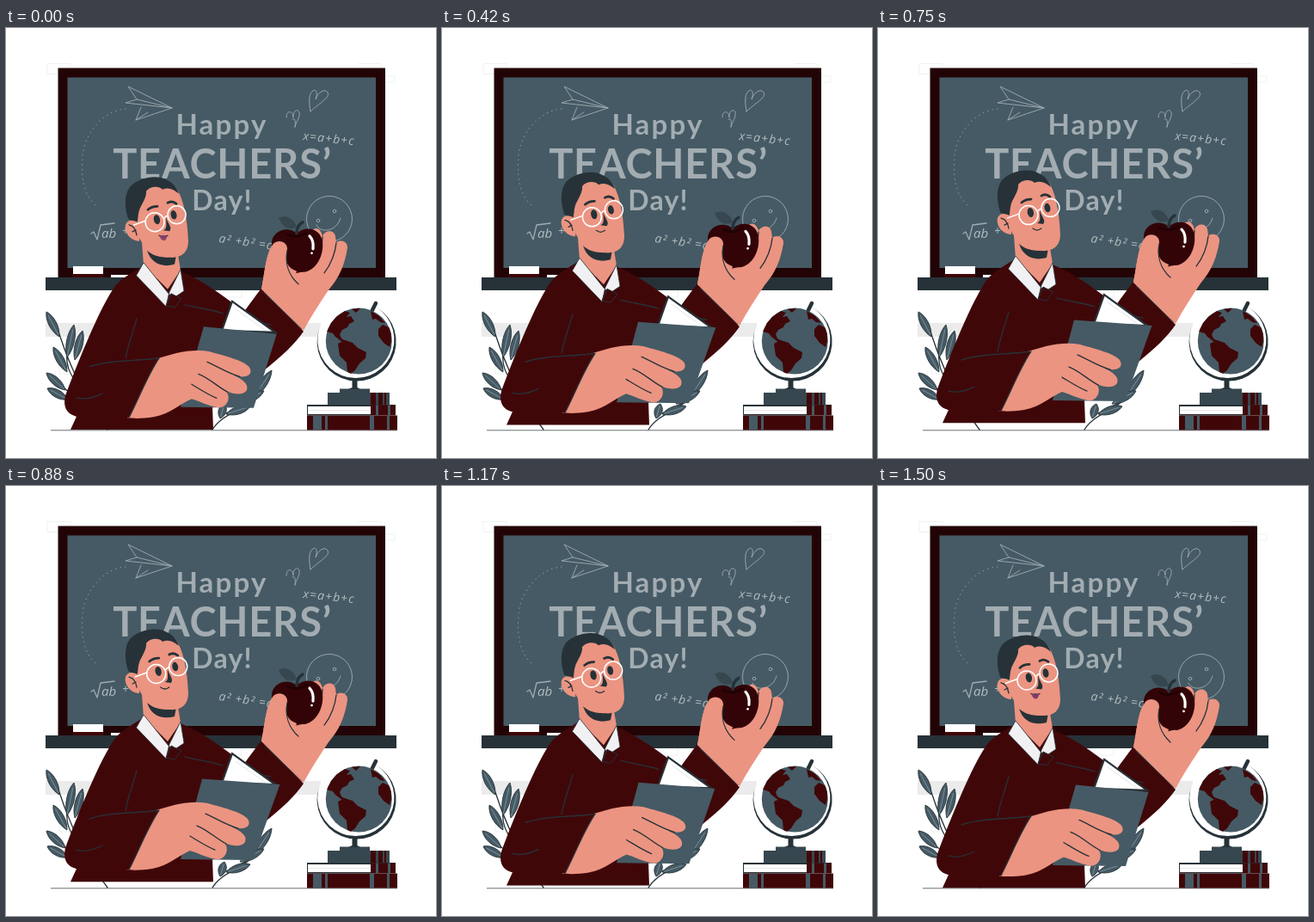
Animation of 500x500 px, one loop 1.54 s. Source, as an HTML page:

```html
<!DOCTYPE html>
<html lang="en">
<head>
<meta charset="utf-8">
<title>Happy Teachers' Day</title>
<style>
html, body { margin: 0; width: 100%; height: 100%; overflow: hidden; background: #fff; }
svg { display: block; width: 100vw; height: 100vh; }
.red { fill: #400709; }
.blue { fill: #455a64; }
.dark { fill: #263238; }
.skin { fill: #eb9481; }
.line { fill: none; stroke: #263238; stroke-width: 1.3; stroke-linecap: round; stroke-linejoin: round; }
.brow { stroke-width: 2.8; }
.chalk { fill: none; stroke: #a2acb1; stroke-width: .9; stroke-linecap: round; stroke-linejoin: round; }
.title { fill: #a2acb1; font-family: Lato, sans-serif; font-weight: 700; text-anchor: middle; }
.sum { fill: #b3bcc0; font: italic 14px "Open Sans", sans-serif; }
.ghost { fill: none; stroke: #e9efed; stroke-width: .8; }
</style>
</head>
<body>
<svg viewBox="0 0 500 500">
  <rect width="500" height="500" fill="#fff"/>

  <!-- wall -->
  <path class="ghost" d="M48 41.500H75V53.500H48ZM410 41.500H436V47M441 56H452V63H441M248 304V313H274V304M62 388V402H76"/>
  <rect x="46" y="343" width="320" height="16" fill="#ebebeb"/>
  <path d="M52 467.800H455" stroke="#263238" stroke-width=".7"/>

  <!-- board -->
  <rect x="60.500" y="46.500" width="380.500" height="245" fill="#230406"/>
  <rect class="blue" x="71.500" y="57.500" width="358.500" height="221.500"/>
  <rect class="dark" x="46" y="290" width="408" height="15"/>
  <rect x="78" y="277" width="35" height="9" fill="#fff"/>
  <rect class="red" x="78" y="286" width="35" height="4"/>
  <rect x="122" y="287" width="25" height="3" fill="#fff"/>

  <g class="title">
    <text x="251" y="124" font-size="33" letter-spacing="2.2">Happy</text>
    <text x="251.500" y="174.500" font-size="47" letter-spacing=".8">TEACHERS’</text>
    <text x="251.500" y="212" font-size="32" letter-spacing="1.2">Day!</text>
  </g>

  <g class="chalk">
    <path d="M193 93L142 68L152 83L193 93L139 87L152 83M193 93L151 107L157 92M151 107L165 98"/>
    <path d="M139 94C112 96 90 125 89 150C87 175 91 195 104 206" stroke-dasharray=".6 5"/>
    <path d="M354 97C352 85 352 76 357 73C362 70 362 78 360 83C363 74 371 70 374 75C377 81 366 86 354 97"/>
    <path d="M336 115C337 108 336 104 333 106M326 104C326 95 334 96 334 104C333 97 339 93 341 98C342 104 338 108 336 115"/>
    <circle cx="376" cy="222" r="26.500"/>
    <circle cx="363" cy="224" r="1.800"/>
    <circle cx="382" cy="213" r="1.800"/>
    <path d="M361 229C366 240 385 236 389 221"/>
    <path d="M99 239L102 237L106 246L110 229L126 227" stroke-width="1.300"/>
  </g>
  <g class="sum">
    <text transform="translate(345 130) rotate(6)" letter-spacing="1.2">x=a+b+c</text>
    <text x="111" y="244" font-size="15">ab</text>
    <text transform="translate(247 249) rotate(8)" letter-spacing=".9">a² +b² =c</text>
    <text x="135" y="241">+</text>
  </g>

  <g id="plants"></g>

  <!-- books -->
  <path d="M388 419.500H423V424H446V438H374V424H388Z" fill="#37474f"/>
  <path class="red" d="M424 424H430V438H424ZM433 424H438V438H433ZM440 424H442V438H440Z"/>
  <path class="dark" d="M350 438H453V450.500H350Z"/>
  <path d="M351 440H424V449H351Z" fill="#fff"/>
  <path d="M351 444.500H423" stroke="#dfe2e4" stroke-width=".8"/>
  <path class="red" d="M424 438.500H453V450H424Z"/>
  <path class="blue" d="M430 438.500H433V450H430ZM444 438.500H447V450H444Z"/>
  <path class="red" d="M350 450.500H455V467.500H350Z"/>
  <path class="blue" d="M357 451H367V467H357ZM371 451H374V467H371ZM423 451H428V467H423ZM443 451H446V467H443Z"/>

  <!-- globe -->
  <path class="dark" d="M402.500 409H408.500V418L412 420H398L402.500 418Z"/>
  <circle cx="407.600" cy="364.600" r="45.500" fill="#fff"/>
  <path class="dark" d="M431 325A46 46 0 1 1 364 350A44.600 44.600 0 1 0 431 325Z"/>
  <path d="M425 330L430 320" stroke="#263238" stroke-width="4.500" stroke-linecap="round"/>
  <circle class="blue" cx="410.300" cy="364" r="38.500"/>
  <path class="red" d="M373 353L378 343L385 335L394 329L400 331L396 336L401 335L405 341L399 344L397 348L391 351L388 356L390 361L395 364L392 366L383 359L380 355Z"/>
  <path class="red" d="M386 367L394 363L403 366L409 372L419 377L418 384L411 390L406 398L401 402L397 400L396 389L388 381Z"/>
  <path class="red" d="M433 350L438 345L445 348C449 355 449 363 446 371L439 366L433 358Z"/>
  <path class="red" d="M424 329L434 335L441 343L435 342L430 338L426 339ZM402 327L412 326L407 331Z"/>

  <!-- teacher -->
  <g id="man">
    <path class="red" d="M160 276C148 284 136 290 128 299C110 322 82 393 69 428C66 440 70 449 82 452L75 467.200H241L240 440L303 396C320 382 336 368 346 353L297 303C290 312 284 320 277 330C258 316 232 295 203 283Z"/>
    <path class="line" d="M152 338C147 356 142 368 139 384M97 395C120 386 150 388 177 384M82 430C96 438 108 425 118 410M208 322C225 326 240 328 252 332M279 331C290 340 297 344 308 345M300 308L344 350"/>

    <path class="skin" d="M157 236L160 276L188 304L203 282L198 252Z"/>
    <path class="dark" d="M164 259C173 267 186 269 198 264L196 275C181 279 169 274 164 259Z"/>
    <path d="M160 273L151.500 288L186 324L190 307L203 281L207 306L195 314L189 309Z" fill="#f1f1f3" stroke="#263238" stroke-width=".8" stroke-linejoin="round"/>
    <path class="red" d="M186 323L192 309L204 315L196 325Z" stroke="#263238"/>

    <path class="skin" d="M150 204C158 182 184 176 196 184C206 195 211 222 212 248C212 262 203 268 190 267C174 267 161 257 155 244Z"/>
    <path class="dark" d="M152 228L142 222C138 209 137 195 144 185C154 174 176 170 187 177C194 180 199 186 201 193C195 187 188 185 182 188C178 183 167 184 163 190C164 197 157 206 155 212C153 217 154 223 152 228Z"/>
    <path class="skin" d="M157 230C151 222 141 222 139 229C137 238 145 248 155 248Z"/>
    <path class="line" d="M143 229C149 230 151 235 152 241M147 237L151 235"/>
    <g id="face">
      <ellipse class="dark" cx="176.500" cy="222.500" rx="3.600" ry="5.600" transform="rotate(-12 176 223)"/>
      <ellipse class="dark" cx="196" cy="217" rx="3.400" ry="5.300" transform="rotate(-12 196 217)"/>
      <path class="line brow" d="M166 211Q170 207 177 207M189 203Q194 200 199 204"/>
      <path class="dark" d="M187 220C189 227 195 232 191 236L184 235C189 233 187 227 187 220Z"/>
      <path class="line" d="M179 241Q184 245 189 241"/>
      <path id="mouth" d="M180 241Q185 240 188 241Q188 247 184 247Q180 246 180 241Z" fill="#7b3b69"/>
      <g fill="none" stroke="#fff" stroke-width="1.500">
        <circle cx="174" cy="225.500" r="11"/>
        <circle cx="199.500" cy="217" r="10.500"/>
        <path d="M185 221Q187 217 190 219M163 224L149 229"/>
      </g>
    </g>

    <!-- raised hand and apple -->
    <path class="skin" d="M297 304C301 285 302 262 311 251L335 282L352 275C358 268 360 250 356 236C360 230 367 234 368 243C370 235 381 234 383 242L384 250C388 245 398 248 397 256C394 275 388 290 375 305C365 320 355 335 346 352Z"/>
    <path class="line" d="M368 243C368 252 365 262 360 271M384 250C383 261 378 275 370 285"/>
    <path d="M338 239C328 230 311 235 309 249C308 264 319 281 331 285C337 287 342 283 347 284C361 282 370 264 368 249C366 233 349 229 338 239Z" fill="#320408"/>
    <path d="M327 240Q339 246 350 238" fill="none" stroke="#200204" stroke-width="2.500" stroke-linecap="round"/>
    <path d="M338 239Q338 230 345 226" fill="none" stroke="#263238" stroke-width="3.500" stroke-linecap="round"/>
    <path d="M317 221C327 216 336 223 338 232C328 236 321 231 317 221Z" fill="#37474f"/>
    <path d="M353 242Q358 247 357 257" fill="none" stroke="#fff" stroke-width="3.200" stroke-linecap="round"/>
    <circle cx="355.500" cy="262" r="1.400" fill="#fff"/>
    <path class="skin" d="M297 304C301 285 302 262 311 251C317 245 328 249 327 258C324 272 327 279 338 283L330 310Z"/>
    <path class="line" d="M327 259C324 274 329 288 340 298"/>

    <!-- book -->
    <path d="M263 318L313 354L251 352Z" fill="#fff" stroke="#263238" stroke-width="2.200"/>
    <path d="M267 327L302 352" fill="none" stroke="#e3e5e7"/>
    <path id="cover" class="blue"/>
    <g id="hand">
      <path class="skin" d="M172 385C192 378 215 372 235 376C252 381 274 386 281 394C286 402 279 406 270 405L262 403C272 408 281 413 278 421C274 427 264 426 254 422C261 430 254 443 244 441C233 439 224 434 214 431C200 437 190 448 170 452C158 454 147 454 139 453Z"/>
      <path class="line" d="M232 388C244 393 255 401 270 405M222 402C235 407 244 417 256 423M214 414C224 420 233 426 243 430"/>
    </g>
    <path class="red" d="M82 452C67 448 80 400 97 394C120 386 150 388 178 384C164 405 155 430 143 453Z"/>
    <path class="line" d="M97 394C120 386 150 388 178 384C164 405 155 430 143 453M82 430C92 433 102 430 112 425"/>
  </g>
</svg>
<script>
const LOOP = 1540, LEAD = 70, RISE = 8;
const $ = id => document.getElementById(id);

// leaf from base to tip, with a pale midrib
function leaf(x, y, tx, ty, w = 6) {
  const len = Math.hypot(tx - x, ty - y);
  const deg = Math.atan2(ty - y, tx - x) * 180 / Math.PI;
  return `<g transform="translate(${x} ${y}) rotate(${deg})">
    <path class="blue" stroke="#263238" stroke-width=".8"
      d="M0 0C${len * .3} ${-w} ${len * .75} ${-w} ${len} 0C${len * .75} ${w} ${len * .3} ${w} 0 0Z"/>
    <path d="M2 0H${len * .85}" stroke="#90a0a8" stroke-width=".7"/></g>`;
}

$("plants").innerHTML =
  `<path class="line" d="M118 467C98 440 77 402 62 356M84 415C72 400 70 390 71 380M92 430C80 428 72 424 66 417M95 435C85 436 76 434 70 431M240 467C252 447 280 445 292 424M256 448L278 437"/>` +
  [[62, 359, 47, 330], [71, 383, 79, 345], [71, 400, 55, 371],
   [80, 386, 89, 352], [69, 421, 47, 401], [72, 432, 48, 419],
   [288, 430, 309, 398], [272, 437, 300, 422], [256, 449, 284, 440], [249, 454, 254, 437]]
    .map(p => leaf(...p)).join("");

function draw(t) {
  const k = (1 - Math.cos(2 * Math.PI * (t + LEAD) / LOOP)) / 2;
  const e = (1 - k) ** 3;
  $("man").setAttribute("transform", `translate(0 ${-RISE * k})`);
  $("face").setAttribute("transform", `translate(${2 * k - 1} ${.5 * e})`);
  $("mouth").setAttribute("opacity", Math.max(0, 1 - k * 6));
  $("hand").setAttribute("transform", `translate(${2 * e} ${.5 * e})`);
  $("cover").setAttribute("d",
    `M${228 + 2 * e} 347.500L${318.500 - 4 * e} ${354 + 2 * e}L${287 + e} 442L203 441Z`);
}

function tick(now) {
  draw(now % LOOP);
  requestAnimationFrame(tick);
}
draw(0);
requestAnimationFrame(tick);
</script>
</body>
</html>
```
